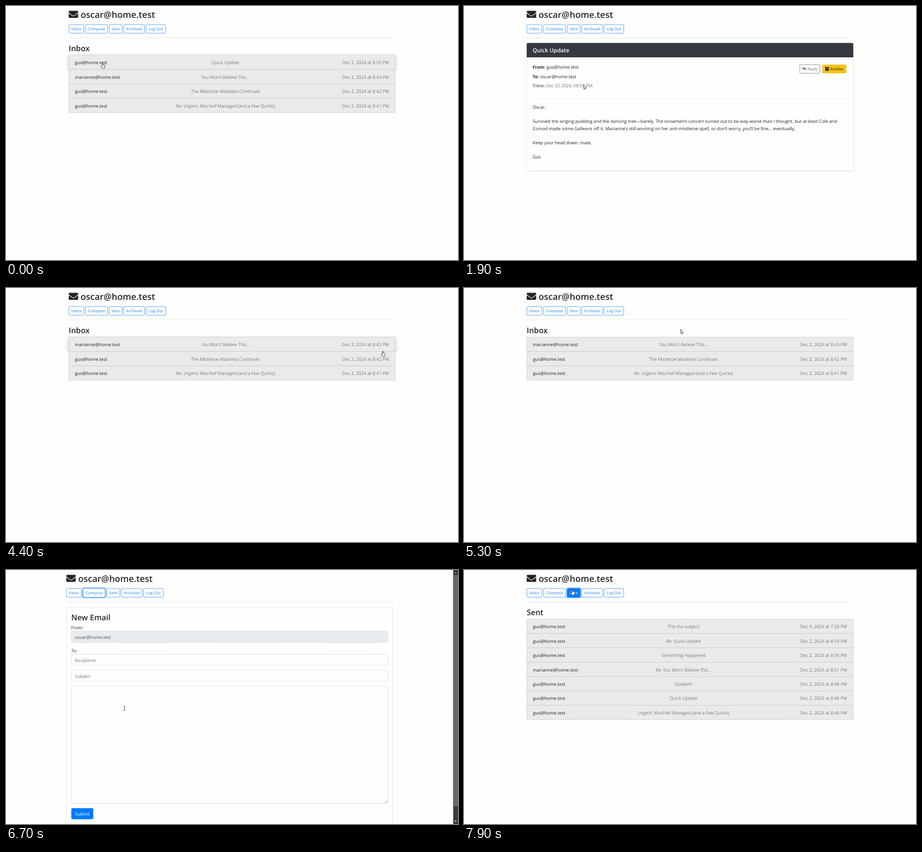
Write an HTML page with a canvas that moves like this. It is 800x450 px and loops after 8000 ms.

```html
<!DOCTYPE html>
<html lang="en">
<head>
<meta charset="utf-8">
<title>Mail</title>
<style>
html, body { margin: 0; width: 100%; height: 100%; overflow: hidden; background: #fefefd; }
canvas { display: block; width: 800px; height: 450px; }
</style>
</head>
<body>
<canvas id="stage" width="800" height="450"></canvas>
<script>
const ctx = document.getElementById('stage').getContext('2d');
const LOOP = 8000, STEP = 100;
const BG = '#fefefd', INK = '#212529', BLUE = '#007bff', GRAY = '#6c757d';
const FONT = '"Open Sans", "Noto Sans", sans-serif';
const BODY = 7.85;
const ME = 'oscar@home.test', PAL = 'gus@home.test', FRIEND = 'marianne@home.test';

const INBOX = [
  [PAL, 'Quick Update', 'Dec 2, 2024 at 8:55 PM'],
  [FRIEND, "You Won't Believe This...", 'Dec 2, 2024 at 8:43 PM'],
  [PAL, 'The Mistletoe Madness Continues', 'Dec 2, 2024 at 8:42 PM'],
  [PAL, 'Re: Urgent: Mischief Managed (and a Few Quirks)', 'Dec 2, 2024 at 8:41 PM']
];
const SENT = [
  [PAL, 'This the subject', 'Dec 9, 2024 at 7:28 PM'],
  [PAL, 'Re: Quick Update', 'Dec 2, 2024 at 8:59 PM'],
  [PAL, 'Something Happened', 'Dec 2, 2024 at 8:56 PM'],
  [FRIEND, "Re: You Won't Believe This...", 'Dec 2, 2024 at 8:51 PM'],
  [PAL, 'Update!!!', 'Dec 2, 2024 at 8:48 PM'],
  [PAL, 'Quick Update', 'Dec 2, 2024 at 8:46 PM'],
  [PAL, 'Urgent: Mischief Managed (and a Few Quirks)', 'Dec 2, 2024 at 8:40 PM']
];
const NAV = [['Inbox', 111, 27], ['Compose', 140.5, 39.5], ['Sent', 182.5, 23.5],
  ['Archived', 208, 37.5], ['Log Out', 247.5, 35.5]];
const LETTER = [
  [182.3, 'Oscar,'],
  [207.3, 'Survived the singing pudding and the dancing tree—barely. The snowmen’s concert turned out to be way worse than I thought, but at least Cole and'],
  [219.8, 'Conrad made some Galleons off it. Marianne’s still working on her anti-mistletoe spell, so don’t worry, you’ll be fine… eventually.'],
  [244.8, 'Keep your head down, mate.'],
  [269.8, 'Gus']
];

// View changes and pointer stops: [time, ...]
const VIEWS = [[0, 'inbox'], [1600, 'letter'], [4000, 'archived'], [6200, 'compose'], [7600, 'sent']];
const PATH = [[0, 171, 101], [500, 168, 168], [1000, 164, 106], [1400, 164, 104], [1700, 164, 104],
  [2200, 300, 205], [2800, 560, 215], [3300, 599, 94], [3800, 660, 111], [4100, 661, 111],
  [4400, 667, 112], [4600, 667, 110], [5200, 400, 76], [5800, 176, 40], [6100, 167, 37],
  [6250, 167, 37], [6700, 209.5, 245], [6950, 146, 431], [7100, 146, 431], [7500, 191, 36],
  [7700, 192, 35], [8000, 192, 35]];

function pointerAt(t) {
  let i = 0;
  while (i < PATH.length - 2 && PATH[i + 1][0] <= t) i++;
  const [t0, x0, y0] = PATH[i], [t1, x1, y1] = PATH[i + 1];
  const k = (t - t0) / (t1 - t0), e = k * k * (3 - 2 * k);
  return { x: x0 + (x1 - x0) * e, y: y0 + (y1 - y0) * e };
}

const inside = (p, x, y, w, h) => p.x >= x && p.x < x + w && p.y >= y && p.y < y + h;

function text(str, x, y, size = BODY, color = INK, weight = 400, align = 'left') {
  ctx.font = `${weight} ${size}px ${FONT}`;
  ctx.fillStyle = color;
  ctx.textAlign = align;
  ctx.fillText(str, x, y);
}

function box(x, y, w, h, r, fill, stroke, width = 0.6) {
  ctx.beginPath();
  ctx.roundRect(x, y, w, h, r);
  if (fill) { ctx.fillStyle = fill; ctx.fill(); }
  if (stroke) { ctx.strokeStyle = stroke; ctx.lineWidth = width; ctx.stroke(); }
}

function shape(points, fill, stroke, width = 0.8) {
  ctx.beginPath();
  points.forEach(([x, y], i) => i ? ctx.lineTo(x, y) : ctx.moveTo(x, y));
  ctx.closePath();
  if (fill) { ctx.fillStyle = fill; ctx.fill(); }
  if (stroke) { ctx.strokeStyle = stroke; ctx.lineWidth = width; ctx.lineJoin = 'round'; ctx.stroke(); }
}

function rule(x, y, w) {
  ctx.fillStyle = 'rgba(0,0,0,.1)';
  ctx.fillRect(x, y, w, 0.7);
}

function envelope() {
  box(111, 8.6, 16.7, 12.5, 1.6, INK);
  ctx.beginPath();
  ctx.moveTo(110.8, 12);
  ctx.bezierCurveTo(117, 16.6, 118, 17.6, 119.35, 17.6);
  ctx.bezierCurveTo(120.7, 17.6, 121.7, 16.6, 127.9, 12);
  ctx.strokeStyle = BG;
  ctx.lineWidth = 1.1;
  ctx.stroke();
}

function header(p, focus) {
  envelope();
  text(ME, 132, 20.6, 15.7, INK, 600);
  for (const [label, x, w] of NAV) {
    const hot = inside(p, x, 32.5, w, 16);
    if (label === focus) box(x - 0.6, 31.9, w + 1.2, 17.2, 2.4, null, 'rgba(0,123,255,.5)', 1.7);
    box(x + 0.3, 32.8, w - 0.6, 15.4, 1.7, hot ? BLUE : BG, hot ? BLUE : '#2b8fee', 0.7);
    text(label, x + w / 2, 43.1, 6.9, hot ? '#fff' : '#1a84ee', 400, 'center');
  }
  rule(111, 56.2, 578);
  return NAV.some(([, x, w]) => inside(p, x, 32.5, w, 16));
}

function list(title, rows, p) {
  const rowH = 25.45;
  let hit = false;
  text(title, 111, 80, 13.7, INK, 600);
  rows.forEach(([who, subject, date], i) => {
    const y = 87 + i * rowH;
    const hot = inside(p, 111, y, 578, rowH);
    hit = hit || hot;
    ctx.save();
    if (hot) {
      ctx.shadowColor = 'rgba(0,0,0,.24)';
      ctx.shadowBlur = 7;
      ctx.shadowOffsetY = 1.5;
    }
    box(111, y, 578, rowH, 0, '#ebe9ec');
    ctx.restore();
    box(111.2, y, 577.6, rowH, 0, null, '#cbcacd', 0.7);
    text(who, 122, y + 16.2, 7.9);
    text(subject, 388.5, y + 16.2, 8, '#3c4043', 300, 'center');
    text(date, 678, y + 16.2, 8, '#3c4043', 300, 'right');
  });
  return hit;
}

function letter(p) {
  ctx.save();
  ctx.shadowColor = 'rgba(0,0,0,.1)';
  ctx.shadowBlur = 3;
  ctx.shadowOffsetY = 1;
  box(111, 65.6, 578, 226, 2, BG);
  ctx.restore();
  box(111.2, 65.8, 577.6, 225.8, 2, null, 'rgba(0,0,0,.09)', 0.5);
  box(111, 65.5, 578, 25.5, [2, 2, 0, 0], '#343a40');
  text('Quick Update', 121.5, 82, 9.9, '#fff', 600);

  text('From:', 121.5, 110.9, BODY, INK, 700);
  text(PAL, 146, 110.9);
  text('To:', 121.5, 127.6, BODY, INK, 700);
  text(ME, 135, 127.6);
  text('Time:', 121.5, 144.3, BODY, GRAY, 700);
  text('Dec 02 2024, 08:55 PM', 145, 144.3, BODY, GRAY);

  const onReply = inside(p, 594, 103.5, 36, 16), onArchive = inside(p, 634, 103.5, 43, 16);
  const tone = onReply ? '#fff' : GRAY;
  box(594.3, 103.8, 35.4, 15.4, 1.7, onReply ? GRAY : BG, GRAY, 0.7);
  shape([[598.4, 110.6], [601.4, 107.8], [601.4, 109.4], [604, 109.7], [605.6, 111.4],
    [605.2, 114.4], [604.3, 112.6], [601.4, 112.1], [601.4, 113.5]], tone);
  text('Reply', 608, 114.1, 6.95, tone);
  box(634.3, 103.8, 42.4, 15.4, 1.7, onArchive ? '#e0a800' : '#f8c211');
  ctx.fillStyle = INK;
  ctx.fillRect(638.9, 108, 7.3, 1.8);
  ctx.fillRect(639.4, 110.3, 6.3, 4.4);
  ctx.fillStyle = '#f8c211';
  ctx.fillRect(641.3, 111.2, 2.5, 0.6);
  text('Archive', 648, 114.1, 6.95, INK);

  rule(121.5, 163.6, 557.5);
  for (const [y, line] of LETTER) text(line, 121.5, y);
  return onReply || onArchive;
}

function field(y, h, label, fill = BG) {
  box(115.5, y, 560.3, h, 2, fill, '#ced4da', 0.6);
  if (label) text(label, 122, y + 13.2, BODY, label === ME ? '#495057' : GRAY);
}

function compose(p) {
  box(107, 66, 577.5, 400, 2, null, 'rgba(0,0,0,.12)', 0.6);
  text('New Email', 115.5, 88.8, 13.7, INK, 600);
  text('From:', 115.5, 105.2);
  field(108.6, 19.7, ME, '#e9ecef');
  text('To:', 115.5, 146);
  field(149.3, 19.5, 'Recipients');
  field(177.5, 19.5, 'Subject');
  field(205.7, 207.8);
  ctx.beginPath();
  for (const d of [4, 1.9]) {
    ctx.moveTo(675 - d, 412.6);
    ctx.lineTo(675, 412.6 - d);
  }
  ctx.strokeStyle = '#555';
  ctx.lineWidth = 0.6;
  ctx.stroke();
  const hot = inside(p, 115.5, 422, 39, 19.6);
  box(115.5, 422, 39, 19.6, 2, hot ? '#0069d9' : BLUE);
  text('Submit', 135, 434.8, BODY, '#fff', 400, 'center');
  return hot;
}

function scrollbar() {
  ctx.fillStyle = '#3a3a3a';
  ctx.fillRect(791.5, 0, 8.5, 450);
  ctx.fillStyle = '#686868';
  ctx.fillRect(791.5, 9, 8.5, 409.5);
  shape([[793.8, 6], [795.8, 3.4], [797.8, 6]], '#8a8a8a');
  shape([[793.8, 444], [795.8, 446.6], [797.8, 444]], '#e0e0e0');
}

function hand() {
  ctx.beginPath();
  ctx.moveTo(-0.9, 0.7);
  ctx.quadraticCurveTo(0, -0.7, 0.9, 0.7);
  ctx.lineTo(0.9, 3.3);
  ctx.lineTo(3.2, 3.8);
  ctx.quadraticCurveTo(4.4, 4.2, 4.2, 5.4);
  ctx.lineTo(3.4, 9.2);
  ctx.lineTo(-0.9, 9.2);
  ctx.lineTo(-2.9, 6.2);
  ctx.quadraticCurveTo(-2.9, 5.1, -0.9, 6);
  ctx.closePath();
  ctx.fillStyle = '#fff';
  ctx.fill();
  ctx.strokeStyle = '#222';
  ctx.lineWidth = 0.75;
  ctx.stroke();
}

function arrow() {
  shape([[0, 0], [0, 7.2], [1.6, 5.8], [2.7, 8.1], [3.7, 7.6], [2.7, 5.4], [4.7, 5.2]], '#fff', '#222', 0.7);
}

function beam() {
  ctx.fillStyle = '#333';
  ctx.fillRect(-0.35, -3.6, 0.7, 7.2);
  ctx.fillRect(-1.5, -3.9, 3, 0.7);
  ctx.fillRect(-1.5, 3.2, 3, 0.7);
}

function pointer(p, draw) {
  ctx.save();
  ctx.translate(p.x, p.y);
  draw();
  ctx.restore();
}

function overText(view, p) {
  if (view === 'compose') return inside(p, 115.5, 149, 560, 264.5);
  return view === 'letter' && LETTER.some(([y]) => inside(p, 121.5, y - 9, 546, 12.5));
}

function render(t) {
  const view = VIEWS.filter(v => v[0] <= t).pop()[1];
  const p = pointerAt(t);
  const shift = view === 'compose' ? -4.3 : 0;
  const focus = { compose: 'Compose', sent: 'Sent' }[view];
  ctx.fillStyle = BG;
  ctx.fillRect(0, 0, 800, 450);
  ctx.save();
  ctx.translate(shift, 0);
  const onNav = header({ x: p.x - shift, y: p.y }, focus);
  ctx.restore();

  let hit = false;
  if (view === 'inbox') hit = list('Inbox', INBOX, p);
  if (view === 'archived') hit = list('Inbox', INBOX.slice(1), p);
  if (view === 'sent') hit = list('Sent', SENT, p);
  if (view === 'letter') hit = letter(p);
  if (view === 'compose') {
    hit = compose(p);
    scrollbar();
  }
  pointer(p, hit || onNav ? hand : overText(view, p) ? beam : arrow);
}

function tick() {
  const t = performance.now() % LOOP;
  render(Math.floor(t / STEP) * STEP);
  requestAnimationFrame(tick);
}

ctx.textRendering = 'geometricPrecision';
tick();
</script>
</body>
</html>
```
